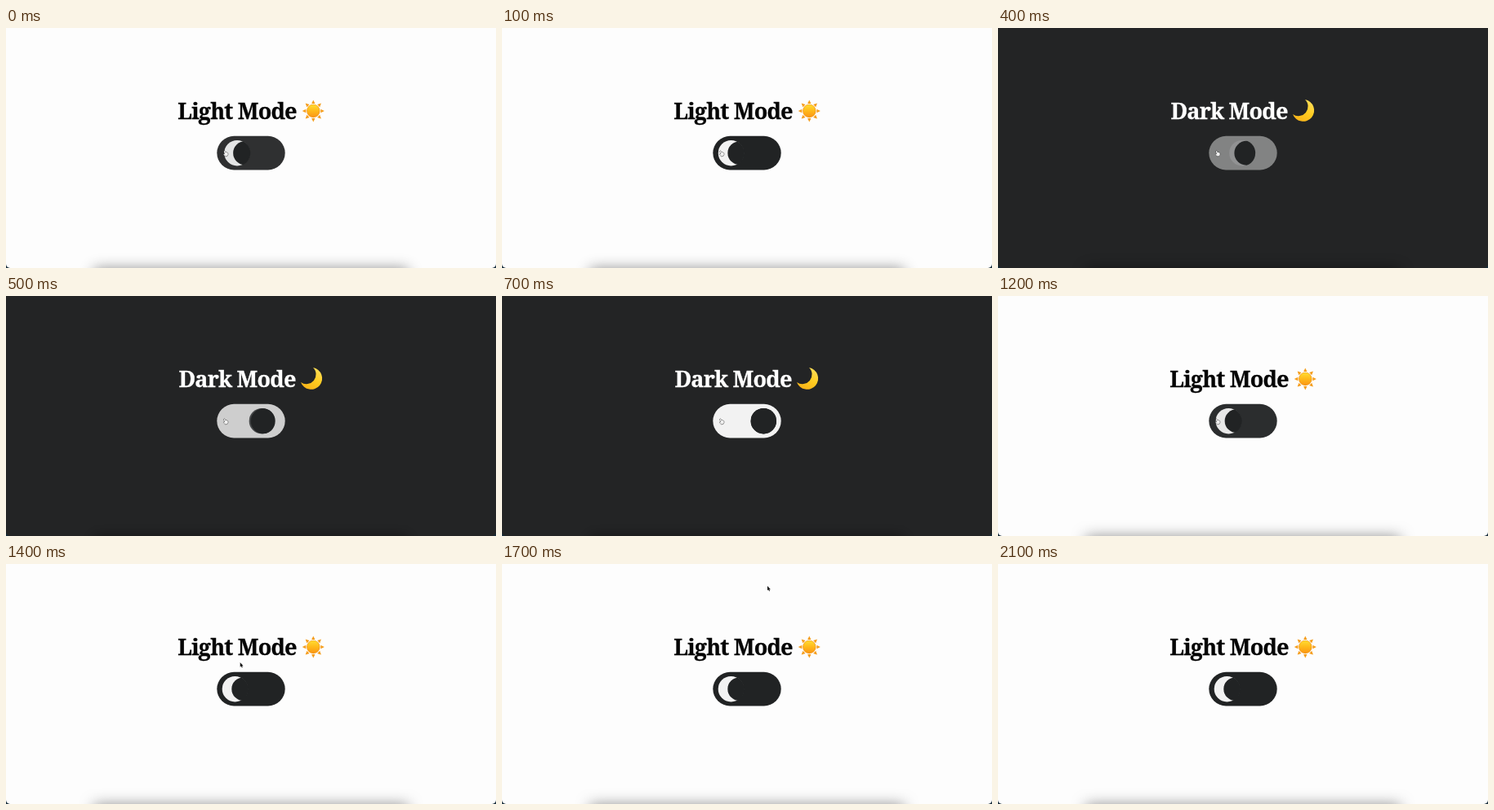
Animation, 600 px wide and 295 px high, one loop 2.5 s. Source, as an HTML page with a canvas:

```html
<!DOCTYPE html>
<html lang="en">
<head>
<meta charset="utf-8">
<title>Theme toggle</title>
<style>
  html, body { margin: 0; width: 100%; height: 100%; overflow: hidden; background: #fdfdfd; }
  canvas { display: block; width: 600px; height: 295px; }
</style>
</head>
<body>
<canvas id="stage"></canvas>
<script>
const W = 600, H = 295, LOOP = 2500, STEP = 100, FADE = 400;
const INK = [33, 35, 36], PAPER = [242, 242, 242];

// Each switch: when it shows, how far into its transition it already is.
const switches = [
  { at: 0, lead: 275, dark: 0 },
  { at: 400, lead: 110, dark: 1 },
  { at: 1000, lead: 91, dark: 0 }
];
const pointer = [
  { at: 0, x: 269, y: 154.3, hand: true },
  { at: 1300, x: 274, y: 145 },
  { at: 1400, x: 286.7, y: 121 },
  { at: 1500, x: 302, y: 92 },
  { at: 1600, x: 316, y: 58 },
  { at: 1700, x: 325, y: 27 },
  { at: 1800, x: 330.5, y: 8 },
  { at: 2000, x: 335, y: 0 },
  { at: 2100, hidden: true }
];

const canvas = document.getElementById('stage');
const ctx = canvas.getContext('2d');
const scale = window.devicePixelRatio || 1;
canvas.width = W * scale;
canvas.height = H * scale;

const crescent = new Path2D('M376 88A13.5 13.5 0 1 1 361 106A11.75 11.75 0 0 0 376 88Z');
const arrow = new Path2D('M0 0V6.6L1.5 5.3L2.5 7.5L3.6 7L2.6 4.9H4.6Z');
const hand = new Path2D('M-2.6 -3.4Q-1.7 -4.2 -1 -3.2L-.2 -1.5Q.6 -2.2 1.1 -1.4Q1.8 -1.9 2.2 -1.1' +
  'Q3.1 -1.1 3.2 0L3.2 2Q2.8 3.8 1 3.9H-.6L-3 1.6Q-3.3 .6 -2.2 .7L-1.3 1Z');

const current = (list, t) => list.filter(e => e.at <= t).pop();
const mix = (a, b, p) => a + (b - a) * p;
const rgb = c => `rgb(${c.map(Math.round)})`;
const blend = (a, b, p) => rgb(a.map((v, i) => mix(v, b[i], p)));

// cubic-bezier(.25, .1, .25, 1)
function ease(x) {
  if (x >= 1) return 1;
  const curve = (s, a, b) => 3 * (1 - s) * (1 - s) * s * a + 3 * (1 - s) * s * s * b + s * s * s;
  let lo = 0, hi = 1;
  for (let i = 0; i < 24; i++) {
    const mid = (lo + hi) / 2;
    if (curve(mid, 0.25, 0.25) < x) lo = mid; else hi = mid;
  }
  return curve(lo, 0.1, 1);
}

function circle(x, y, r, fill) {
  ctx.beginPath();
  ctx.arc(x, y, r, 0, Math.PI * 2);
  ctx.fillStyle = fill;
  ctx.fill();
}

function gradient(x0, y0, x1, y1, ...colors) {
  const g = ctx.createLinearGradient(x0, y0, x1, y1);
  colors.forEach((c, i) => g.addColorStop(i / (colors.length - 1), c));
  return g;
}

function drawPage(dark) {
  ctx.fillStyle = '#152b3a';
  ctx.fillRect(0, 0, W, H);
  ctx.beginPath();
  ctx.roundRect(0, -10, W, H + 10, 5);
  ctx.fillStyle = dark ? '#232425' : '#fdfdfd';
  ctx.fill();

  ctx.save();
  ctx.clip();
  ctx.shadowColor = 'rgba(0,0,0,.46)';
  ctx.shadowBlur = 17 * scale;
  ctx.fillStyle = '#000';
  ctx.fillRect(108, H + 1, 384, 40);
  ctx.restore();
}

function drawSun() {
  ctx.save();
  ctx.translate(376.3, 102);
  ctx.fillStyle = '#f59d1c';
  for (let i = 0; i < 8; i++) {
    ctx.beginPath();
    ctx.moveTo(0, -13.6);
    ctx.lineTo(2.2, -9);
    ctx.lineTo(-2.2, -9);
    ctx.fill();
    ctx.rotate(Math.PI / 4);
  }
  circle(0, 0, 8.2, '#f59a1b');
  circle(0, -0.3, 7.4, gradient(0, -8, 0, 8, '#ffdd33', '#ffb91a', '#fb9414'));
  ctx.restore();
}

function drawMoon() {
  ctx.fillStyle = gradient(382, 90, 368, 115, '#ffdd55', '#ffcb1f', '#f7b21a');
  ctx.fill(crescent);
}

function drawTitle(dark) {
  const text = dark ? 'Dark Mode' : 'Light Mode';
  ctx.font = '600 27px "Noto Serif", serif';
  ctx.letterSpacing = '-0.8px';
  ctx.textAlign = 'center';
  ctx.fillStyle = ctx.strokeStyle = dark ? '#fff' : '#060606';
  ctx.lineWidth = 0.3;
  ctx.fillText(text, 283, 111.5);
  ctx.strokeText(text, 283, 111.5);
  if (dark) drawMoon(); else drawSun();
}

function drawToggle(p) {
  ctx.beginPath();
  ctx.roundRect(258.3, 132.8, 83.4, 41.6, 20.8);
  ctx.fillStyle = blend(INK, PAPER, p);
  ctx.fill();

  // The shade slides and grows inside the knob; a slightly wide clip hides the knob's rim.
  const x = mix(280.4, 320.3, p), y = 153.7, r = 15.7;
  circle(x, y, r, blend(PAPER, INK, p));
  ctx.save();
  ctx.beginPath();
  ctx.arc(x, y, r + 0.6, 0, Math.PI * 2);
  ctx.clip();
  circle(x + mix(10.2, 0, p), y, mix(14.3, r, p), rgb(INK));
  ctx.restore();
}

function drawPointer({ x, y, hand: grab, hidden }) {
  if (hidden) return;
  ctx.save();
  ctx.translate(x, y);
  ctx.scale(0.85, 0.85);
  ctx.lineJoin = 'round';
  const shape = grab ? hand : arrow;
  ctx.strokeStyle = grab ? '#222' : '#fff';
  ctx.fillStyle = grab ? '#eee' : '#111';
  ctx.lineWidth = 1;
  ctx.stroke(shape);
  ctx.fill(shape);
  ctx.restore();
}

const start = performance.now();

function frame() {
  const t = Math.floor(((performance.now() - start) % LOOP) / STEP) * STEP;
  const { at, lead, dark } = current(switches, t);
  const done = ease((t - at + lead) / FADE);
  ctx.setTransform(scale, 0, 0, scale, 0, 0);
  drawPage(dark);
  drawTitle(dark);
  drawToggle(dark ? done : 1 - done);
  drawPointer(current(pointer, t));
  requestAnimationFrame(frame);
}
frame();
</script>
</body>
</html>
```
